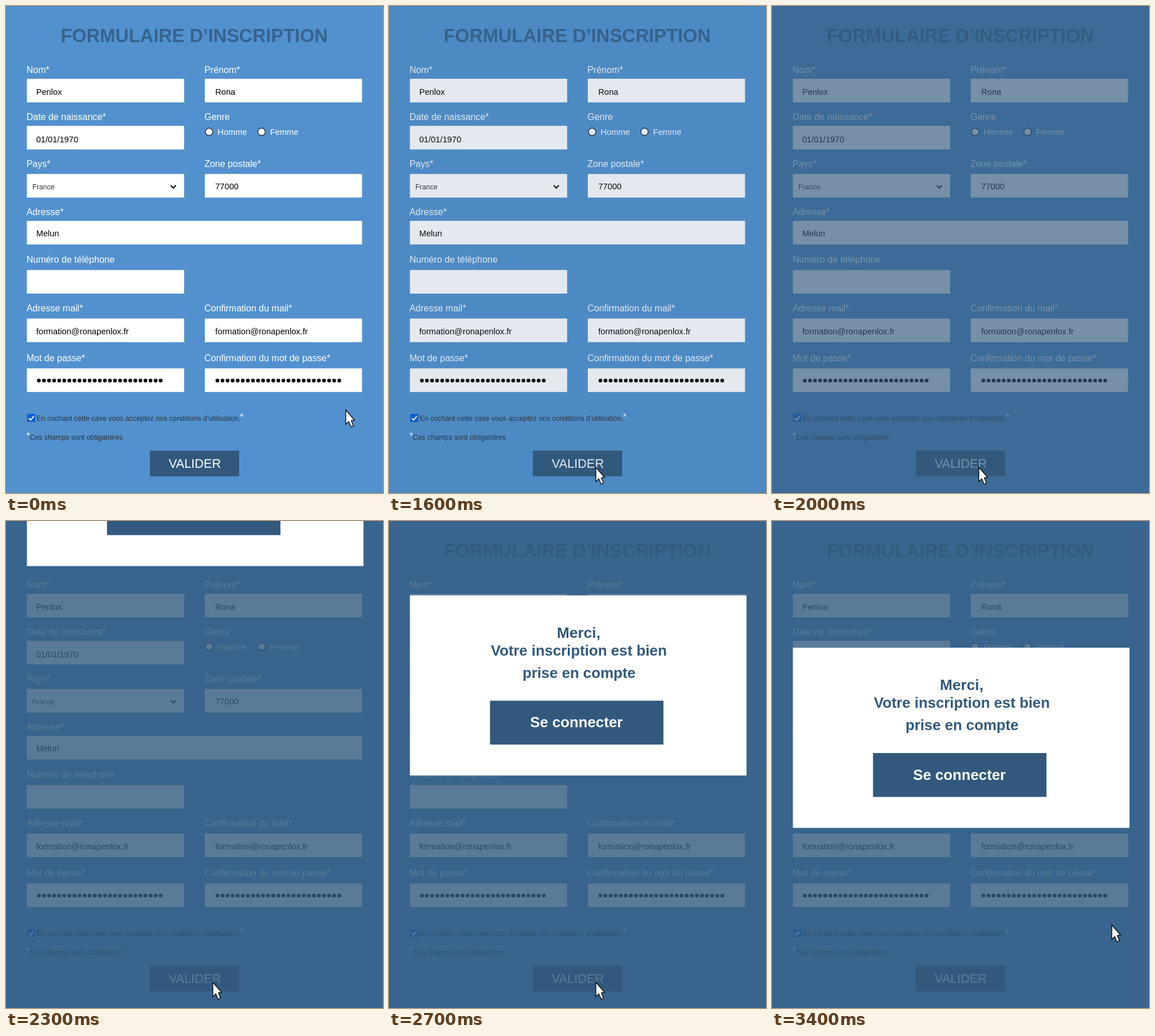
Write an HTML page that moves like this. It is 658 by 850 pixels and loops after 5.4 s.

```html
<!DOCTYPE html>
<html lang="fr">
<head>
<meta charset="utf-8">
<title>Formulaire d’inscription</title>
<style>
html, body { margin: 0; width: 100%; height: 100%; overflow: hidden; background: #5291ce; }
svg { display: block; font-family: Arial, "Liberation Sans", sans-serif; }
.label { font-size: 16px; fill: #fff; }
.value { font-size: 14.67px; fill: #000; }
.choice { font-size: 14.67px; fill: #fff; }
.small { font-size: 12.4px; fill: #2d3338; }
.bold { font-size: 25.75px; font-weight: bold; fill: #32597d; text-anchor: middle; }
.dots { stroke: #000; stroke-width: 6.6; stroke-linecap: round; stroke-dasharray: 0 8.86; }
</style>
</head>
<body>
<svg width="658" height="850" viewBox="0 0 658 850">
  <rect width="658" height="850" fill="#5291ce"/>
  <text class="bold" x="328.5" y="63" style="font-size:32.4px;fill:#36638e">FORMULAIRE D’INSCRIPTION</text>
  <g id="form"></g>

  <g fill="#fff" stroke="#34495e" stroke-width="1.8">
    <circle cx="354.5" cy="219.5" r="6.5"/>
    <circle cx="446" cy="219.5" r="6.5"/>
  </g>
  <path d="M287.5 313l4.5 4.7 4.5-4.7" fill="none" stroke="#000" stroke-width="2"/>
  <path class="dots" d="M57.4 653.7h213"/>
  <path class="dots" d="M369 653.7h213"/>

  <rect x="37" y="712" width="14" height="14" fill="#0b5fd8"/>
  <path d="M39.8 719.5l3.2 3.3 5.5-7" fill="none" stroke="#fff" stroke-width="2"/>
  <rect x="251" y="776" width="156" height="45" fill="#32597d"/>
  <text x="329.5" y="806" text-anchor="middle" font-size="21.7" fill="#fff">VALIDER</text>

  <rect id="veil" width="658" height="850" fill="#32597d" opacity="0"/>

  <g id="popup">
    <rect x="36.5" y="221.2" width="587.5" height="314.4" fill="#fff"/>
    <text class="bold" x="331" y="295" style="font-size:26.3px">Merci,</text>
    <text class="bold" x="331.3" y="326">Votre inscription est bien</text>
    <text class="bold" x="331.7" y="365">prise en compte</text>
    <rect x="176.3" y="405" width="302.7" height="76.6" fill="#32597d"/>
    <text class="bold" x="327.2" y="451.5" style="fill:#fff">Se connecter</text>
  </g>

  <path id="cursor" d="M1 1V26L6.2 21.3 10.2 30.5 14.4 28.8 10.7 19.6 16.3 18.7Z"
    fill="#fff" stroke="#000" stroke-width="1.3"/>
</svg>
<script>
const $ = id => document.getElementById(id);
const form = $('form');

function add(tag, attrs, content = '') {
  const el = document.createElementNS('http://www.w3.org/2000/svg', tag);
  for (const key in attrs) el.setAttribute(key, attrs[key]);
  el.textContent = content;
  form.append(el);
}
const text = (cls, x, y, content) => add('text', { class: cls, x, y }, content);
const box = (x, y, width = 274.4) => add('rect', { x, y, width, height: 41.2, fill: '#fff' });

const L = 36.5, R = 347;
const mail = 'formation@ronapenlox.fr';

// column, label baseline, label, box top, value baseline, value, box width
const fields = [
  [L, 117, 'Nom*', 127, 155, 'Penlox'],
  [R, 117, 'Prénom*', 127, 155, 'Rona'],
  [L, 199, 'Date de naissance*', 209.2, 237.5, '01/01/1970'],
  [L, 280.5, 'Pays*', 293.2, 0, ''],
  [R, 280.5, 'Zone postale*', 293.2, 320, '77000'],
  [L, 364.5, 'Adresse*', 375, 402, 'Melun', 585],
  [L, 448, 'Numéro de téléphone', 460.8, 0, ''],
  [L, 533, 'Adresse mail*', 545.5, 573, mail],
  [R, 533, 'Confirmation du mail*', 545.5, 573, mail],
  [L, 620, 'Mot de passe*', 632.5, 0, ''],
  [R, 620, 'Confirmation du mot de passe*', 632.5, 0, '']
];
for (const [x, labelY, label, top, valueY, value, width] of fields) {
  text('label', x - 0.8, labelY, label);
  box(x, top, width);
  if (value) text('value', x === L ? 52.7 : 365.2, valueY, value);
}
text('label', 346.2, 199, 'Genre');
text('choice', 369.3, 225, 'Homme');
text('choice', 460.7, 225, 'Femme');
text('small', 46, 319.7, 'France');
text('small', 53.4, 724, 'En cochant cette case vous acceptez nos conditions d’utilisation.');
text('label', 408.2, 723, '*');
text('label', 35.8, 756, '*');
text('small', 41.5, 757, 'Ces champs sont obligatoires');

// Progress from 0 to 1 in six equal steps of 100 ms
const steps = (t, start) => Math.max(0, Math.min(6, Math.floor((t - start) / 100) + 1)) / 6;

function draw(now) {
  const t = now % 5400;
  const away = steps(t, 100) - steps(t, 2900);
  $('cursor').setAttribute('transform', `translate(${592 - 232 * away} ${704 + 100 * away})`);
  $('veil').setAttribute('opacity', 0.8 * steps(t, 1600));
  $('popup').setAttribute('transform', `translate(0 ${-548.4 * (1 - steps(t, 2300))})`);
  requestAnimationFrame(draw);
}
draw(0);
</script>
</body>
</html>
```
